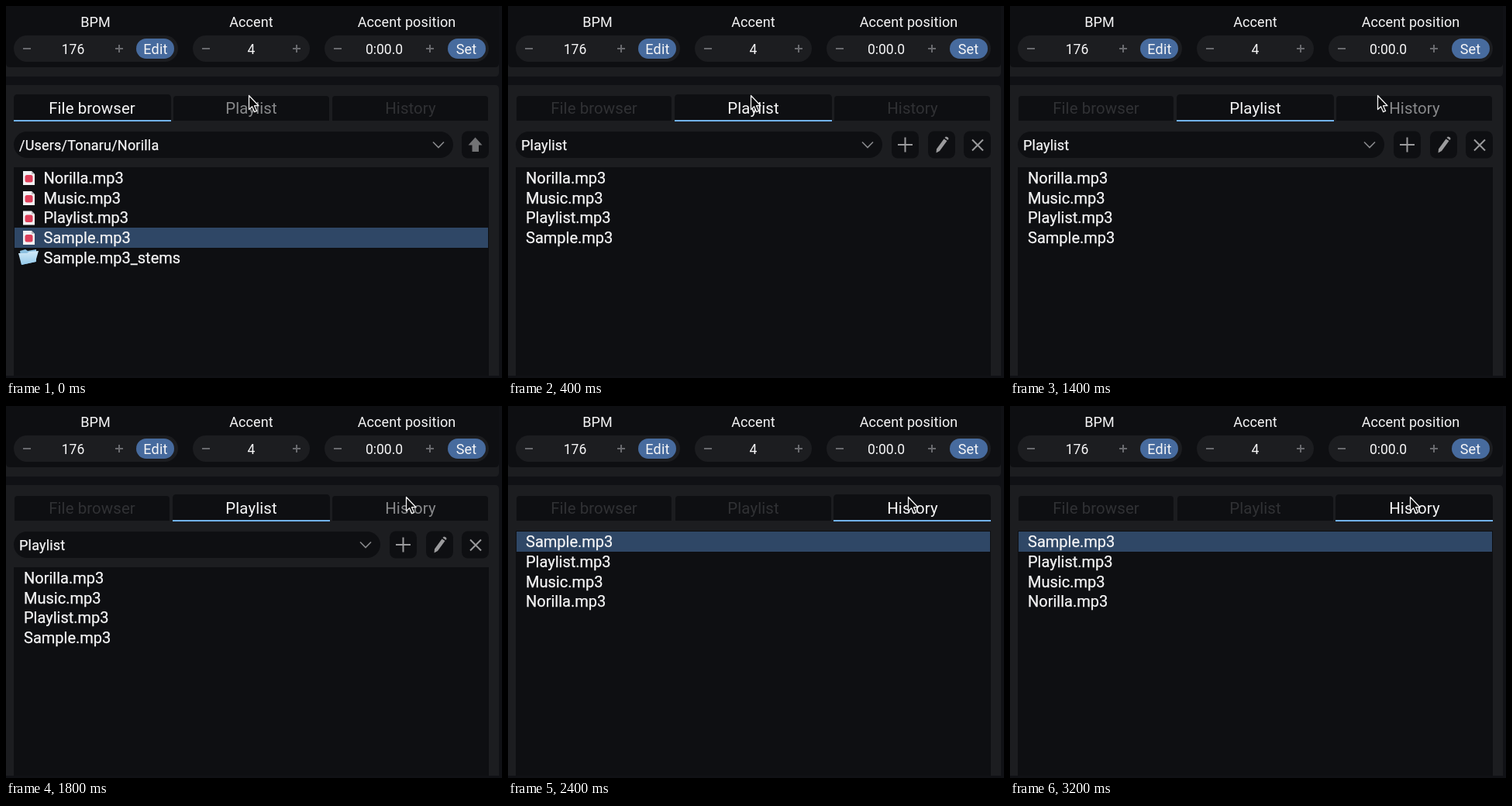
Write an HTML page that moves like this. It is 640 px wide and 480 px high and loops after 3.4 s.

```html
<!DOCTYPE html>
<html lang="en">
<head>
<meta charset="utf-8">
<title>Track browser</title>
<style>
  html, body { margin: 0; width: 100%; height: 100%; overflow: hidden; background: #101115; }
  svg { display: block; width: 640px; height: 480px; }
  text { font: 20px Roboto, "Noto Sans", sans-serif; fill: #f6f6f7; }
  .view text { stroke: #f6f6f7; stroke-width: .25px; }
  .mid text { text-anchor: middle; }
  .head text { font-size: 18px; letter-spacing: .12px; }
  .value text { font-size: 17.5px; }
  .btn text, text.field { font-size: 18px; letter-spacing: .2px; }
  .tabs text { font-size: 20.4px; letter-spacing: .1px; }
  .panel { fill: #1c1d20; }
  .well { fill: #0e0f12; }
  .btn rect { fill: #476b9e; }
  .row { fill: #2f4766; }
  .bar { fill: #72b3f2; }
  .sign { stroke: #696a6e; stroke-width: 2; fill: none; }
  .icon { stroke: #9b9b9d; stroke-width: 2; fill: none; }
  .chevron { stroke: #88898c; stroke-width: 1.6; fill: none; }

  .view, .tab, #cursor { animation: 3400ms step-end infinite; }
  #files { animation-name: files; }
  #playlist { animation-name: playlist; }
  #history { animation-name: history; }
  #tabFiles { animation-name: tab-files; }
  #tabPlaylist { animation-name: tab-playlist; }
  #tabHistory { animation-name: tab-history; }
  #cursor { animation-name: point; }

  @keyframes files { 0% { opacity: 1 } 11.76%, 100% { opacity: 0 } }
  @keyframes playlist { 0% { opacity: 0 } 11.76% { opacity: 1 } 70.58%, 100% { opacity: 0 } }
  @keyframes history { 0% { opacity: 0 } 70.58%, 100% { opacity: 1 } }
  @keyframes tab-files { 0% { fill: #f6f6f7 } 11.76%, 100% { fill: #303134 } }
  @keyframes tab-playlist { 0% { fill: #88898b } 11.76% { fill: #f6f6f7 } 70.58%, 100% { fill: #303134 } }
  @keyframes tab-history { 0% { fill: #303134 } 41.17% { fill: #88898b } 70.58%, 100% { fill: #f6f6f7 } }
  @keyframes point {
    0% { transform: translate(313px, 115px) }
    29.41% { transform: translate(334px, 115px) }
    35.29% { transform: translate(400px, 115px) }
    41.17% { transform: translate(474px, 115px) }
    47.05% { transform: translate(513px, 116px) }
    52.94%, 100% { transform: translate(516px, 117px) }
  }
</style>
</head>
<body>
<svg viewBox="0 0 640 480">
  <defs>
    <linearGradient id="sky" x2="0" y2="1">
      <stop stop-color="#d3eaf7"/><stop offset="1" stop-color="#93c9ea"/>
    </linearGradient>
    <path id="minus" class="sign" d="M-5 0H5"/>
    <path id="plus" class="sign" d="M-5 0H5M0 -5V5"/>
    <path id="chevron" class="chevron" d="M-7 -3.5L0 3.5L7 -3.5"/>
    <rect id="square" class="well" width="35" height="35" rx="8"/>
    <g id="song">
      <path d="M22 -9H33L37 -5V9H22Z" fill="#f1f1f3"/>
      <path d="M33 -9V-5H37Z" fill="#b9babd"/>
      <rect x="24.5" y="-4" width="10" height="9.500" rx="2.500" fill="#dd3f5a"/>
    </g>
    <g id="folder">
      <path d="M18 -8L25 -10L28 -8L39 -10V6L20 10Z" fill="#8cc0e0"/>
      <path d="M16 -5L27 -5L30 -7L42 -8L38 6L20 10Z" fill="url(#sky)"/>
    </g>
  </defs>

  <rect width="640" height="480" fill="#101115"/>
  <path class="panel" d="M0 0H636V86Q636 91 631 91H0Z"/>
  <path class="well" d="M0 0H636V74Q636 79 631 79H5Q0 79 0 74Z"/>
  <path class="panel" d="M0 102H631Q636 102 636 107V477H0Z"/>

  <g class="head mid">
    <text x="115.500" y="26.500">BPM</text>
    <text x="316.500" y="26.500">Accent</text>
    <text x="517" y="26.500">Accent position</text>
  </g>
  <g class="panel">
    <rect x="10" y="38" width="212" height="34" rx="17"/>
    <rect x="241" y="38" width="151" height="34" rx="17"/>
    <rect x="411" y="38" width="212" height="34" rx="17"/>
  </g>
  <use href="#minus" x="27" y="55"/><use href="#plus" x="146" y="55"/>
  <use href="#minus" x="258" y="55"/><use href="#plus" x="375" y="55"/>
  <use href="#minus" x="428" y="55"/><use href="#plus" x="547" y="55"/>
  <g class="value mid">
    <text x="86.500" y="61.500">176</text>
    <text x="316.500" y="61.500">4</text>
    <text x="488" y="61.500">0:00.0</text>
  </g>
  <g class="btn mid">
    <rect x="168" y="42" width="49" height="26" rx="13"/>
    <rect x="570" y="42" width="49" height="26" rx="13"/>
    <text x="193" y="61.500">Edit</text>
    <text x="594" y="61.500">Set</text>
  </g>

  <g class="well">
    <path d="M11 148V120Q11 116 15 116H207Q211 116 211 120V148Z"/>
    <path d="M216 148V120Q216 116 220 116H413Q417 116 417 120V148Z"/>
    <path d="M421 148V120Q421 116 425 116H618Q622 116 622 120V148Z"/>
  </g>

  <g id="files" class="view">
    <path class="well" d="M10 148V119Q10 114 15 114H208Q213 114 213 119V148Z"/>
    <rect class="bar" x="10" y="147" width="203" height="2"/>
    <rect class="well" x="10" y="162" width="567" height="34" rx="17"/>
    <text class="field" x="17" y="185.500">/Users/Tonaru/Norilla</text>
    <use href="#chevron" x="558" y="179"/>
    <use href="#square" x="588" y="161.500"/>
    <path d="M605.500 169.500L614.500 179.500H610V188H601.500V179.500H596.500Z" fill="#727375"/>
    <rect class="well" x="10" y="208" width="613" height="269"/>
    <rect class="row" x="11" y="286" width="611" height="26"/>
    <use href="#song" y="222"/><use href="#song" y="248"/>
    <use href="#song" y="273.500"/><use href="#song" y="299"/>
    <use href="#folder" y="324"/>
    <text x="48.500" y="229">Norilla.mp3</text>
    <text x="48.500" y="254.500">Music.mp3</text>
    <text x="48.500" y="280">Playlist.mp3</text>
    <text x="48.500" y="306">Sample.mp3</text>
    <text x="48.500" y="331.500">Sample.mp3_stems</text>
  </g>

  <g id="playlist" class="view">
    <path class="well" d="M215 148V119Q215 114 220 114H413Q418 114 418 119V148Z"/>
    <rect class="bar" x="215" y="147" width="203" height="2"/>
    <rect class="well" x="10" y="162" width="473" height="34" rx="17"/>
    <text class="field" x="17" y="185.500">Playlist</text>
    <use href="#chevron" x="464" y="179"/>
    <use href="#square" x="495" y="161.500"/>
    <use href="#square" x="542" y="161.500"/>
    <use href="#square" x="588" y="161.500"/>
    <path class="icon" d="M503 179H522M512.500 169.500V188.500M599 172.500L613 186.500M613 172.500L599 186.500"/>
    <path d="M562.500 171.500L566.500 174L557 187L552.500 189.500L553 184.500ZM563.500 170L565 168.500Q568.500 169 568.500 171.500L567.500 173Z" fill="#9b9b9d"/>
    <rect class="well" x="10" y="208" width="613" height="269"/>
    <text x="23" y="229">Norilla.mp3</text>
    <text x="23" y="254.500">Music.mp3</text>
    <text x="23" y="280">Playlist.mp3</text>
    <text x="23" y="306">Sample.mp3</text>
  </g>

  <g id="history" class="view">
    <path class="well" d="M420 148V119Q420 114 425 114H618Q623 114 623 119V148Z"/>
    <rect class="bar" x="420" y="147" width="203" height="2"/>
    <rect class="well" x="10" y="161" width="613" height="316"/>
    <rect class="row" x="11" y="162" width="611" height="26"/>
    <text x="23" y="182">Sample.mp3</text>
    <text x="23" y="207.500">Playlist.mp3</text>
    <text x="23" y="233.500">Music.mp3</text>
    <text x="23" y="259">Norilla.mp3</text>
  </g>

  <g class="tabs mid">
    <text id="tabFiles" class="tab" x="111" y="139">File browser</text>
    <text id="tabPlaylist" class="tab" x="316.500" y="139">Playlist</text>
    <text id="tabHistory" class="tab" x="522" y="139">History</text>
  </g>

  <path id="cursor" d="M.5 .5V18.500L4.600 14.800L7.700 21.700L10.600 20.400L7.600 13.700H13Z" fill="#0b0b0d" stroke="#f4f4f4" stroke-width="1.300" stroke-linejoin="round"/>
</svg>
</body>
</html>
```
